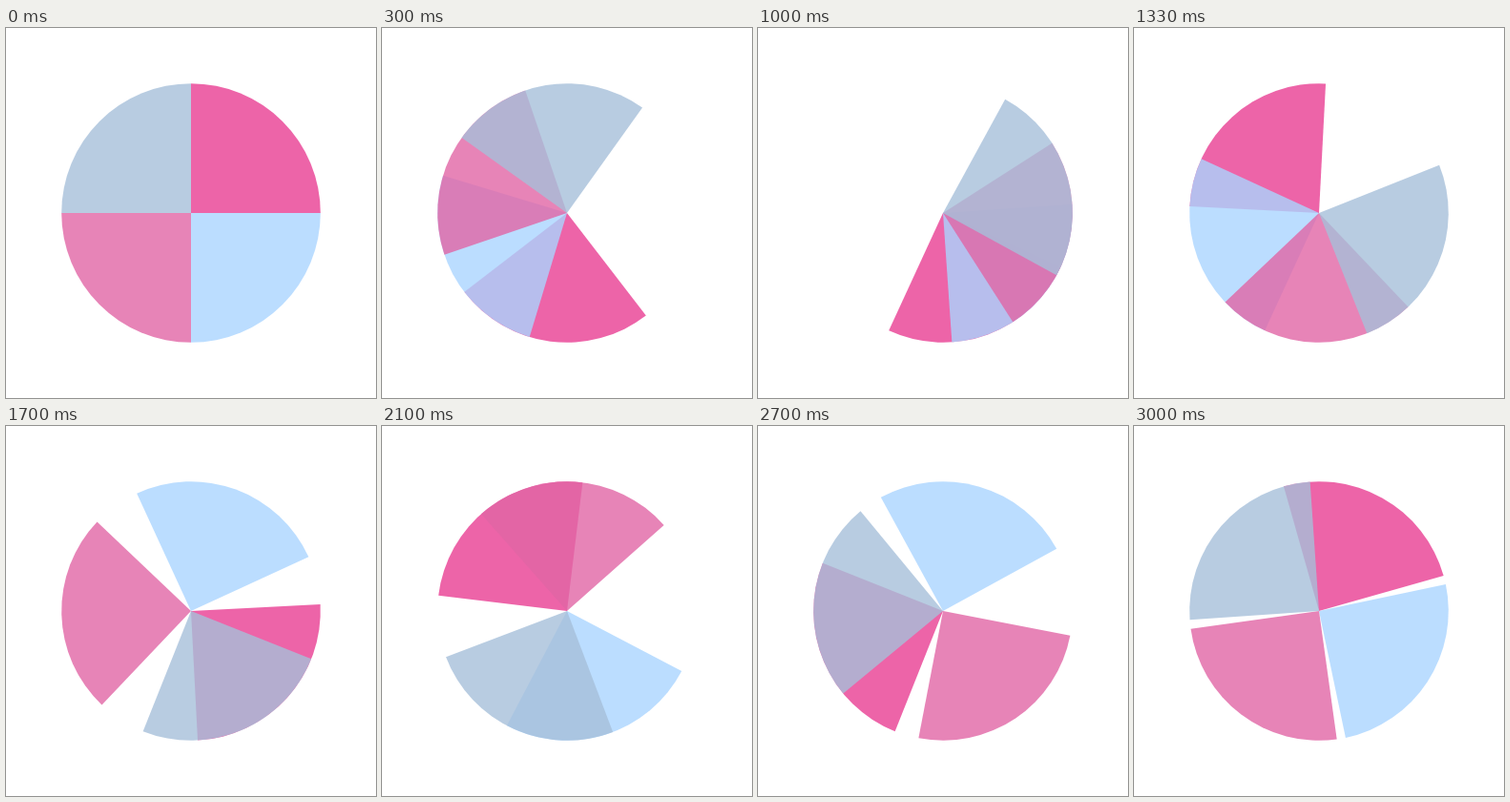
These frames come from a looping animation (388 by 388 pixels, 3030 ms). An HTML page with a canvas:

```html
<!DOCTYPE html>
<html lang="en">
<head>
<meta charset="utf-8">
<title>Wedges</title>
<style>
  html, body { margin: 0; width: 100%; height: 100%; overflow: hidden; background: #fff; }
  canvas { display: block; width: 388px; height: 388px; }
</style>
</head>
<body>
<canvas id="stage" width="388" height="388"></canvas>
<script>
const ctx = document.getElementById('stage').getContext('2d');
const SIZE = 388, CENTER = SIZE / 2, RADIUS = SIZE * 0.35;
const LOOP = 3030, STEPS = 91, STEP_MS = 100 / 3;
const QUARTER = Math.PI / 2;

// Bottom to top; wedge i turns (4 - i) times per loop.
const COLORS = ['#e93e93', '#aad5ff', '#e166a6', '#a7c0da'];

// Thirty steps per second, each starting on a whole 10 ms tick.
function stepAt(ms) {
  const tick = Math.floor((ms % LOOP) / 10 + 0.001) * 10;
  return Math.floor((tick + 5) / STEP_MS) % STEPS;
}

function wedge(start, color) {
  ctx.fillStyle = color;
  ctx.beginPath();
  ctx.moveTo(CENTER, CENTER);
  ctx.arc(CENTER, CENTER, RADIUS, start, start + QUARTER);
  ctx.closePath();
  ctx.fill();
}

function draw(ms) {
  const turn = stepAt(ms) / STEPS * 2 * Math.PI;
  ctx.globalAlpha = 1;
  ctx.fillStyle = '#fff';
  ctx.fillRect(0, 0, SIZE, SIZE);
  ctx.globalAlpha = 0.8;
  COLORS.forEach((color, i) => wedge((i - 1) * QUARTER + turn * (4 - i), color));
}

const begin = performance.now();
function tick(now) {
  draw(Math.max(0, now - begin));
  requestAnimationFrame(tick);
}
draw(0);
requestAnimationFrame(tick);
</script>
</body>
</html>
```
